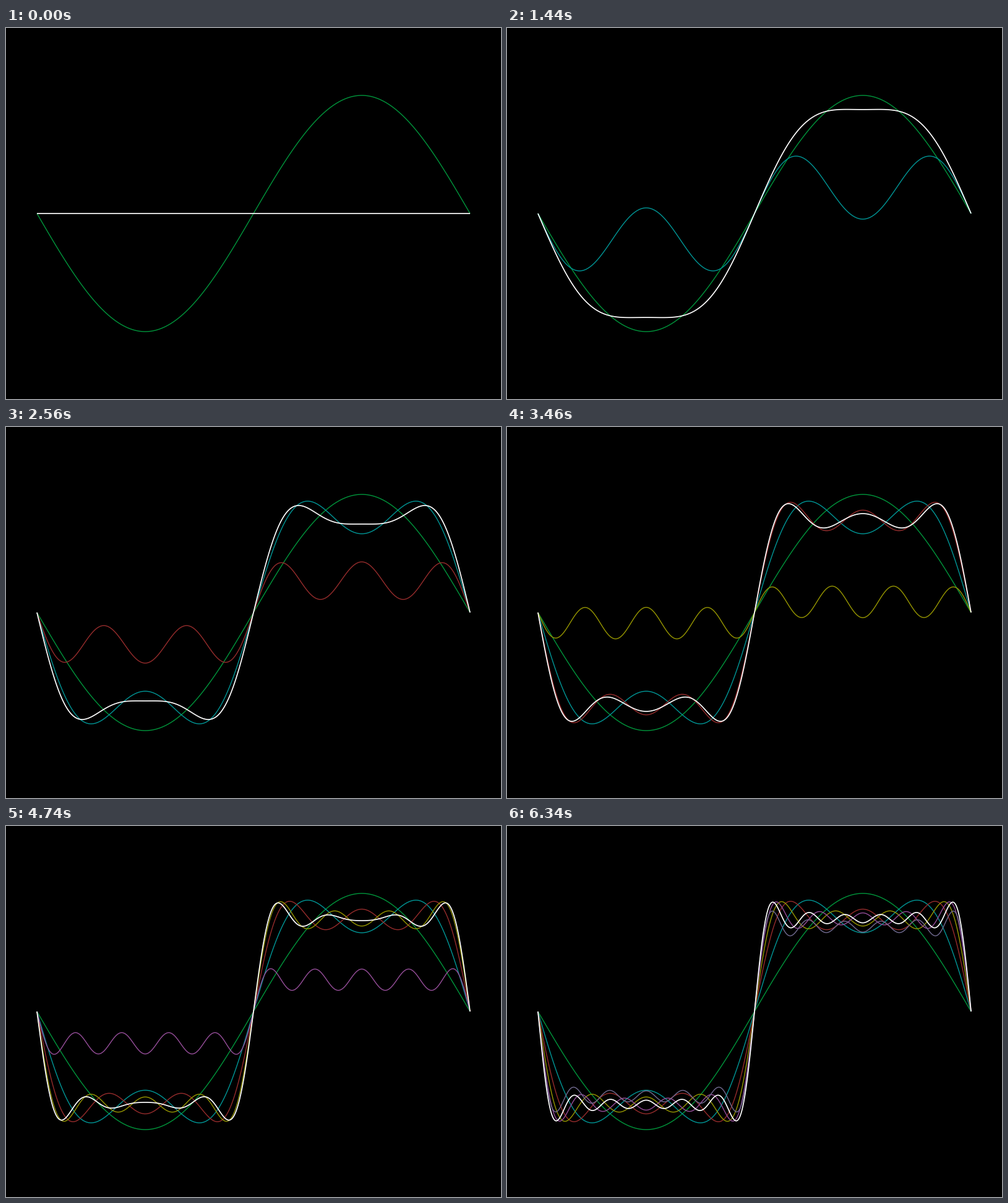
A matplotlib script for the animation above (6400 ms loop, 800 px wide and 600 px high).

```python
import numpy as np
import matplotlib.pyplot as plt
from matplotlib.animation import FuncAnimation

LOOP_MS = 6400
STEPS = 20        # frames per harmonic
DPI = 100
PX = 72 / DPI     # one pixel in points
COLORS = ["#00963c", "#009696", "#962c2c", "#969600", "#964e9a", "#726c92"]
FRAMES = STEPS * len(COLORS)

plt.rcParams["path.simplify"] = False

x = np.linspace(50, 750, 701)
u = (x - 400) / 350 * np.pi
orders = 2 * np.arange(len(COLORS)) + 1
terms = [600 / np.pi * np.sin(n * u) / n for n in orders]
sums = [np.zeros_like(x), *np.cumsum(terms, axis=0)]


def ramp(p, start, end):
    return min(max((p - start) / (end - start), 0), 1)


fig = plt.figure(figsize=(8, 6), dpi=DPI, facecolor="black")
ax = fig.add_axes([0, 0, 1, 1])
ax.set(xlim=(0, 800), ylim=(-300, 300))
ax.axis("off")


def add_line(color, width):
    line, = ax.plot([], [], color=color, lw=width * PX,
                    solid_capstyle="butt", solid_joinstyle="round")
    line.set_snap(False)
    return line


waves = [add_line(c, 1.4) for c in COLORS]
total = add_line("white", 1.7)


def update(frame):
    stage, step = divmod(frame, STEPS)
    p = step / STEPS
    lift = ramp(p, 0.1, 0.975)
    for k, wave in enumerate(waves):
        if k < stage:
            wave.set_data(x, sums[k + 1])
        elif k == stage:
            # the new harmonic rises onto the sum so far
            wave.set_data(x, terms[k] + lift * sums[k])
        else:
            wave.set_data([], [])
    total.set_data(x, sums[stage] + ramp(p, 0, 0.975) * terms[stage])
    return [*waves, total]


anim = FuncAnimation(fig, update, frames=FRAMES, interval=LOOP_MS / FRAMES,
                     repeat=True, repeat_delay=0, blit=False)
plt.show()
```
